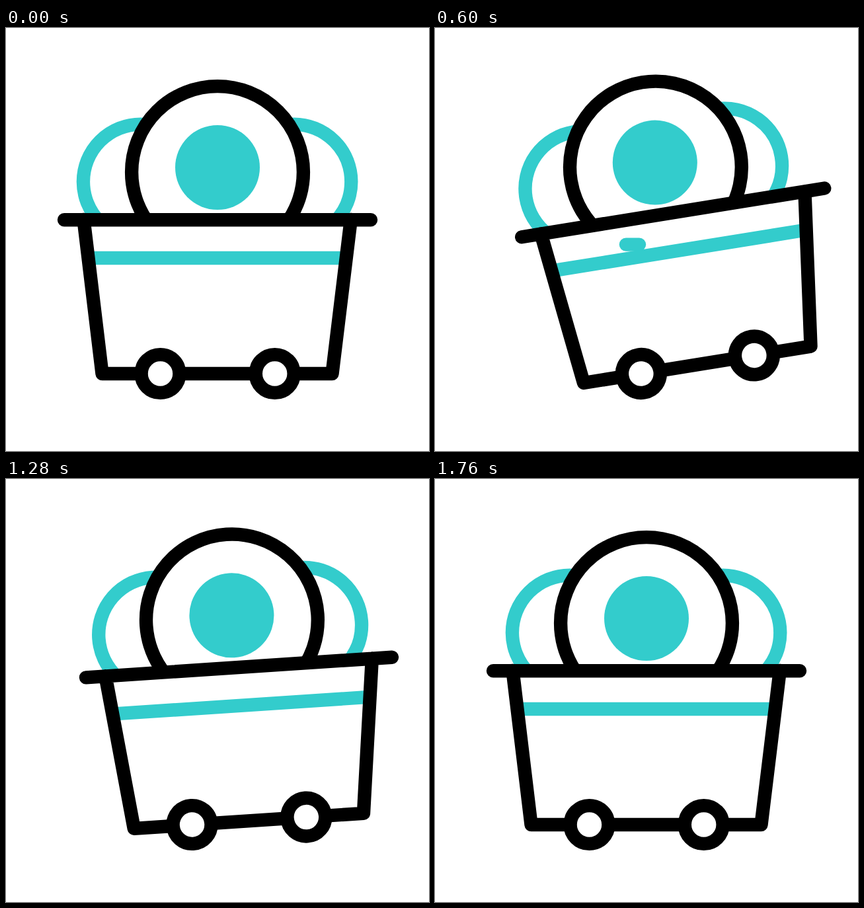
Animation of 640x640 px, one loop 2.4 s. Source, as an HTML page:

```html
<!DOCTYPE html>
<html lang="en">
<head>
<meta charset="utf-8">
<title>Mine cart</title>
<style>
  html, body { margin: 0; width: 100%; height: 100%; overflow: hidden; background: #fff; }
  svg { display: block; width: 100vw; height: 100vh; }
  .ink, .teal { fill: none; stroke-width: 20.4; stroke-linecap: round; stroke-linejoin: round; }
  .ink { stroke: #000; }
  .teal { stroke: #3cc; }
  .solid { fill: #fff; }
</style>
</head>
<body>
<svg viewBox="0 0 640 640">
  <defs>
    <clipPath id="aboveRim"><rect x="-200" y="-200" width="1040" height="490"/></clipPath>
  </defs>
  <g id="cart">
    <g clip-path="url(#aboveRim)">
      <circle id="leftCoin" class="teal" cx="203.8" cy="232.6" r="86.9"/>
      <circle id="rightCoin" class="teal" cx="435.4" cy="232.6" r="86.9"/>
      <g id="mainCoin">
        <circle class="ink solid" cx="320" cy="218" r="129.9"/>
        <circle cx="320" cy="211" r="64" fill="#3cc"/>
      </g>
    </g>
    <path class="teal" d="M127 348H513"/>
    <path class="ink" d="M117.5 290L145.5 523H493.5L521.8 290M88 290.2H552"/>
    <circle class="ink solid" cx="233.5" cy="523" r="28.9"/>
    <circle class="ink solid" cx="406.7" cy="523" r="28.9"/>
  </g>
  <path id="upperStreak" class="teal"/>
  <path id="lowerStreak" class="teal"/>
</svg>
<script>
const LOOP = 2400, STEP = 40;
const PIVOT = '233.5 523';
const HELD_TILT = 9.15, OVERSHOOT = 1.65;
const DROP = 880, LANDING = 1140, REST = 1760;

const el = id => document.getElementById(id);
const progress = (t, start, length) => Math.min(1, Math.max(0, (t - start) / length));
const ease = (t, start, length) => (1 - Math.cos(Math.PI * progress(t, start, length))) / 2;
const wheelie = t => ease(t, 30, 300);

// A nudge during the wheelie, a dash to the right, then the way back.
function travel(t) {
  const out = 6.5 * wheelie(t) + 90.5 * ease(t, 222, 540);
  const back = ease(progress(t, 730, 845) ** 1.6, 0, 1);
  return out - 97 * back;
}

// Wheelie with overshoot, then a fall that ends in shrinking hops.
function tilt(t) {
  if (t < DROP) return (HELD_TILT + OVERSHOOT) * wheelie(t) - OVERSHOOT * ease(t, 330, 180);
  if (t < LANDING) return HELD_TILT * (1 - progress(t, DROP, LANDING - DROP) ** 2);
  if (t >= REST) return 0;
  let start = LANDING, length = 236, height = 3.95;
  while (t >= start + length) {
    start += length;
    length *= 0.87;
    height *= 0.48;
  }
  return height * Math.sin(Math.PI * (t - start) / length);
}

// Coins lag behind the cart and slide back into place.
function slide(id, t, distance, returnStart) {
  const dx = distance * (ease(t, 150, 630) - ease(t, returnStart, 710));
  el(id).setAttribute('transform', `translate(${-dx} 0)`);
}

function streak(id, y, t, start) {
  const head = 309 - 180 * ease(t, start, 240);
  const tail = 309 - 180 * ease(t, start + 100, 240);
  el(id).setAttribute('d', tail - head > 0.5 ? `M${tail} ${y}H${head}` : '');
}

function draw(t) {
  el('cart').setAttribute('transform', `translate(${travel(t)} 0) rotate(${-tilt(t)} ${PIVOT})`);
  slide('leftCoin', t, 16.2, 855);
  slide('mainCoin', t, 18.5, 840);
  slide('rightCoin', t, 33.5, 870);
  streak('upperStreak', 327.6, t, 548);
  streak('lowerStreak', 441.4, t, 785);
}

const begin = performance.now();
function tick() {
  const t = (performance.now() - begin) % LOOP;
  draw(Math.floor(t / STEP) * STEP);
  requestAnimationFrame(tick);
}
draw(0);
requestAnimationFrame(tick);
</script>
</body>
</html>
```
